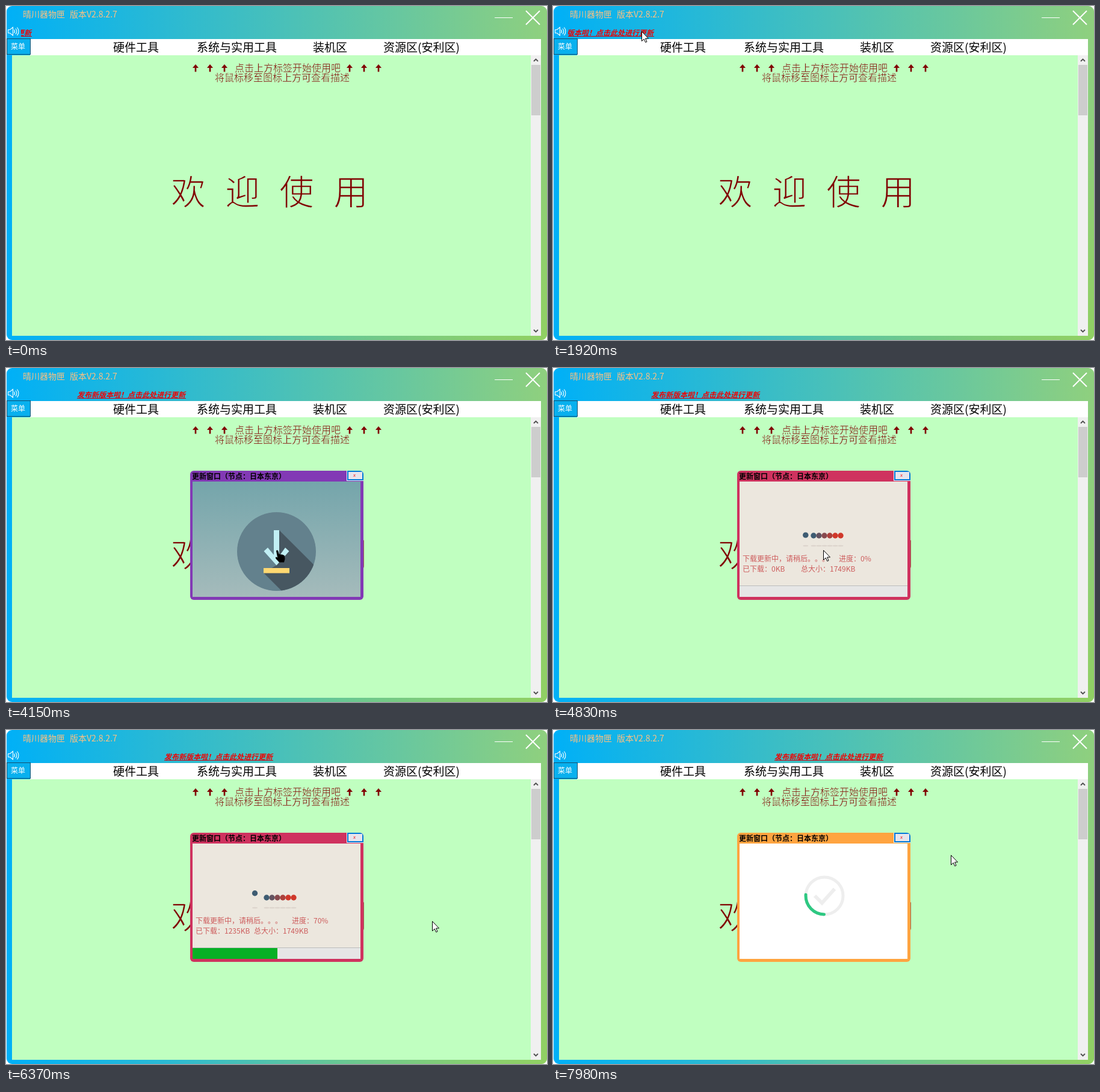
Write an HTML page that moves like this. It is 899 px wide and 556 px high and loops after 8000 ms.

```html
<!DOCTYPE html>
<html lang="zh-CN">
<head>
<meta charset="utf-8">
<title>更新演示</title>
<style>
  html, body { margin: 0; width: 100%; height: 100%; overflow: hidden; background: #fff; }
  svg { display: block; width: 899px; height: 556px; }
  text {
    font-family: "Noto Sans CJK SC", "Noto Sans CJK", "Noto Sans", sans-serif;
    white-space: pre; text-spacing-trim: space-all;
  }
  .title { font-size: 14px; fill: #ffc080; }
  .tab { font-size: 19px; }
  /* a stroke in the page colour thins the glyphs */
  .hint, .hello { fill: #800000; stroke: #c0ffc0; }
  .hint { font-size: 16px; font-weight: 300; stroke-width: .4; }
  .hello { font-size: 58px; font-weight: 200; stroke-width: 1.7; }
  .info { font-size: 12px; fill: #cd5c5c; }
  .line { fill: none; stroke: #fff; }
</style>
</head>
<body>
<svg viewBox="0 0 899 556">
  <defs>
    <linearGradient id="frame">
      <stop offset="0" stop-color="#00b0f7"/>
      <stop offset="1" stop-color="#8fd07e"/>
    </linearGradient>
    <linearGradient id="corner" x1=".65" y1=".65" x2="1" y2="1">
      <stop offset="0" stop-color="#92d050" stop-opacity="0"/>
      <stop offset="1" stop-color="#92d050" stop-opacity=".6"/>
    </linearGradient>
    <linearGradient id="sky" x2="0" y2="1">
      <stop offset="0" stop-color="#74a5ab"/>
      <stop offset="1" stop-color="#a5bbbb"/>
    </linearGradient>
    <clipPath id="newsClip"><rect x="25" y="36" width="840" height="18"/></clipPath>
    <clipPath id="disc"><circle cx="449.5" cy="305.5" r="65.5"/></clipPath>
    <clipPath id="popClip"><rect x="306" y="171" width="288" height="215" rx="6"/></clipPath>
    <path id="up" d="M0 97L5 103H1.3V109.5H-1.3V103H-5Z" fill="#800000"/>
  </defs>

  <!-- main window -->
  <rect x="1" width="898" height="556" rx="9" fill="url(#frame)"/>
  <rect x="1" width="898" height="556" rx="9" fill="url(#corner)"/>
  <text class="title" x="28" y="19">晴川器物匣</text>
  <text class="title" x="106" y="19">版本V2.8.2.7</text>
  <path class="line" d="M812 19.5H842"/>
  <path class="line" stroke-width="2" d="M864 8L887 31M887 8L864 31"/>
  <path class="line" stroke-width="1.1" d="M3.5 39.5H6.5L11.5 35.5V49L6.5 45H3.5ZM13.5 39.5Q15.5 42.3 13.5 45M16 37.5Q19.5 42.3 16 47M18.5 35.5Q23.5 42.3 18.5 49"/>
  <g clip-path="url(#newsClip)">
    <g id="news">
      <text y="49" font-size="12" font-weight="700" font-style="italic" fill="#f00000">发布新版本啦！点击此处进行更新</text>
      <path d="M0 50.5H181" stroke="#d00010"/>
    </g>
  </g>
  <rect x="40" y="55" width="849" height="27" fill="#fff"/>
  <rect x="1.5" y="54.5" width="39" height="26" fill="#08b0ee" stroke="#14506f"/>
  <text x="8" y="72" font-size="12" fill="#fff">菜单</text>
  <g class="tab">
    <text x="178" y="76">硬件工具</text>
    <text x="317" y="76">系统与实用工具</text>
    <text x="510" y="76">装机区</text>
    <text x="627" y="76">资源区(安利区)</text>
  </g>
  <rect x="10" y="82" width="862" height="467" fill="#c0ffc0"/>
  <rect x="872" y="82" width="17" height="467" fill="#f0f0f0"/>
  <rect x="873" y="98" width="15" height="84" fill="#cdcdcd"/>
  <path d="M877 92L880.5 88.5L884 92M877 539L880.5 542.5L884 539" fill="none" stroke="#505050" stroke-width="1.8"/>
  <g id="arrows"></g>
  <text class="hint" x="380" y="109">点击上方标签开始使用吧</text>
  <text class="hint" x="347" y="125">将鼠标移至图标上方可查看描述</text>
  <g class="hello">
    <text x="274" y="331">欢</text><text x="364" y="331">迎</text>
    <text x="454" y="331">使</text><text x="544" y="331">用</text>
  </g>

  <!-- update window -->
  <g id="popup" clip-path="url(#popClip)">
    <rect id="border" x="306" y="171" width="288" height="215"/>
    <text x="309" y="185" font-size="12" font-weight="700">更新窗口（节点：日本东京）</text>
    <rect x="566" y="171" width="28" height="17" fill="#f4f4f4"/>
    <rect x="568" y="172" width="25" height="14" fill="#e6e4ec" stroke="#0078d7" stroke-width="2"/>
    <text x="577" y="181" font-size="9" font-style="italic" fill="#f00000" style="font-family:'Liberation Serif',serif">x</text>

    <g id="ready">
      <rect x="310" y="189" width="279" height="192" fill="url(#sky)"/>
      <g clip-path="url(#disc)">
        <circle cx="449.5" cy="305.5" r="66" fill="#63818d"/>
        <path d="M454 270L534 350L508 421L428 341L450 328Z" fill="#475761"/>
      </g>
      <path d="M445 270H454V313L464 299L470.5 305L449.5 328.5L428.5 305L435 299L445 311Z" fill="#c1eff4"/>
      <rect x="428" y="333" width="43" height="8.5" fill="#ffd871"/>
    </g>

    <g id="loading">
      <rect x="310" y="189" width="279" height="192" fill="#ece7de"/>
      <g id="cradle"></g>
      <text class="info" x="315" y="322">下载更新中，请稍后。。。</text>
      <text class="info" x="475" y="322" id="percent"></text>
      <text class="info" x="315" y="339" id="got"></text>
      <text class="info" x="412" y="339">总大小：1749KB</text>
      <rect x="310" y="362" width="279" height="19" fill="#e6e6e6"/>
      <path d="M310 362.5H589" stroke="#bcbcbc"/>
      <rect id="bar" x="310" y="363" height="18" fill="#06b025"/>
    </g>

    <g id="done">
      <rect x="310" y="189" width="279" height="192" fill="#fff"/>
      <g fill="none" stroke="#eee" stroke-width="5">
        <circle cx="451" cy="276" r="31"/>
        <path d="M435 276L447 288L468 264.5" stroke-width="6"/>
        <circle id="arc" cx="451" cy="276" r="31" stroke="#2ec882" stroke-linecap="round" stroke-dasharray="50 400"/>
      </g>
    </g>
  </g>

  <path id="pointer" d="M.5 .5V16.5L4.2 13L6.7 18.5L9 17.5L6.6 12H11.5Z" fill="#fff" stroke="#000"/>
  <path id="hand" d="M0 1.5Q1.5-1 3.3 1.5L5 7.5Q6.5 6 8 7.7Q9.6 6.5 11 8.3Q13.5 7.5 14 10.5L14.5 15L13 20.5H5L-.5 14.5Q-2 11.5 .5 11.5L2.2 12.8Z"/>
</svg>
<script>
const LOOP = 8000, STEP = 76.8, TOTAL = 1749;
const OPEN = 48, RECOLOR = 55, START = 60, DONE = 88;
const $ = id => document.getElementById(id);
const svg = (tag, attrs, parent) => {
  const el = document.createElementNS('http://www.w3.org/2000/svg', tag);
  for (const k in attrs) el.setAttribute(k, attrs[k]);
  return parent.appendChild(el);
};
const clamp = v => Math.max(0, Math.min(1, v));
const show = (id, on) => $(id).setAttribute('display', on ? 'inline' : 'none');
const move = (id, x, y = 0) => $(id).setAttribute('transform', `translate(${x} ${y})`);

for (const x of [315, 339, 363, 571, 595, 619])
  svg('use', { href: '#up', x }, $('arrows'));

const balls = [], shades = [];
for (let i = 0; i < 7; i++) {
  const k = clamp((i - 1) / 4), mix = (a, b) => Math.round(a + (b - a) * k);
  shades.push(svg('ellipse', { cy: 296, rx: 4.5, ry: 1.2, fill: '#ddd5cd' }, $('cradle')));
  balls.push(svg('circle', { r: 4.7, fill: `rgb(${mix(62, 208)},${mix(92, 56)},${mix(114, 42)})` }, $('cradle')));
}

// step, x, y of the mouse
const MOUSE = [
  [20, 32, 102], [21, 78, 72], [22, 142, 42], [25, 147, 42], [30, 208, 41], [33, 203, 41],
  [40, 195, 44], [47, 196, 44], [49, 314, 152], [51, 449, 303], [67, 449, 303],
  [70, 640, 290], [72, 672, 294], [74, 683, 295], [77, 697, 297], [82, 709, 318],
  [90, 701, 321], [95, 701, 321], [98, 643, 222], [104, 661, 208]
];
// first step and colour of the window border
const BORDER = [[OPEN, '#8239b5'], [RECOLOR, '#cf325f'], [DONE, '#fa623a'], [94, '#ff833c'], [101, '#ffa440']];

function mouseAt(n) {
  const i = MOUSE.findIndex(p => p[0] > n);
  if (i < 0) return MOUSE[MOUSE.length - 1].slice(1);
  const a = MOUSE[i - 1], b = MOUSE[i], k = (n - a[0]) / (b[0] - a[0]);
  return [1, 2].map(j => Math.round(a[j] + (b[j] - a[j]) * k));
}

function drawCradle(t) {
  const swing = Math.cos((t - 5683) / 1200 * 2 * Math.PI) * 1.36;
  balls.forEach((ball, i) => {
    const a = i === 6 ? Math.max(0, swing) : i === 0 ? Math.min(0, swing) : 0;
    const x = 424 + 9 * i + 11.2 * Math.sin(a);
    ball.setAttribute('cx', x);
    ball.setAttribute('cy', 279 - 11.2 * (1 - Math.cos(a)));
    shades[i].setAttribute('cx', x);
  });
}

function draw(ms) {
  const n = Math.floor((ms + 20) / STEP), t = n * STEP;
  // the text stalls while the update window opens
  move('news', -138 + 5 * n - 14 * clamp((n - 45) / 3));

  show('popup', n >= OPEN);
  show('ready', n < START);
  show('loading', n >= START && n < DONE);
  show('done', n >= DONE);
  const tone = BORDER.filter(b => b[0] <= n).pop();
  if (tone) $('border').setAttribute('fill', tone[1]);

  const progress = at => clamp((at - 5332.5) / 1475);
  const p = progress(t);
  $('percent').textContent = `进度：${Math.floor(p * 100)}%`;
  $('got').textContent = `已下载：${Math.floor(p * TOTAL)}KB`;
  $('bar').setAttribute('width', Math.round(279 * progress(t - 298)));
  drawCradle(t);
  $('arc').setAttribute('transform', `rotate(${-66 + (t - 6912) * 0.146} 451 276)`);

  const hand = n >= 51 && n < START;
  show('pointer', n >= 20 && !hand);
  show('hand', hand);
  if (n >= 20) move(hand ? 'hand' : 'pointer', ...mouseAt(n));
}

const begin = performance.now();
function tick() {
  draw((performance.now() - begin) % LOOP);
  requestAnimationFrame(tick);
}
tick();
</script>
</body>
</html>
```
